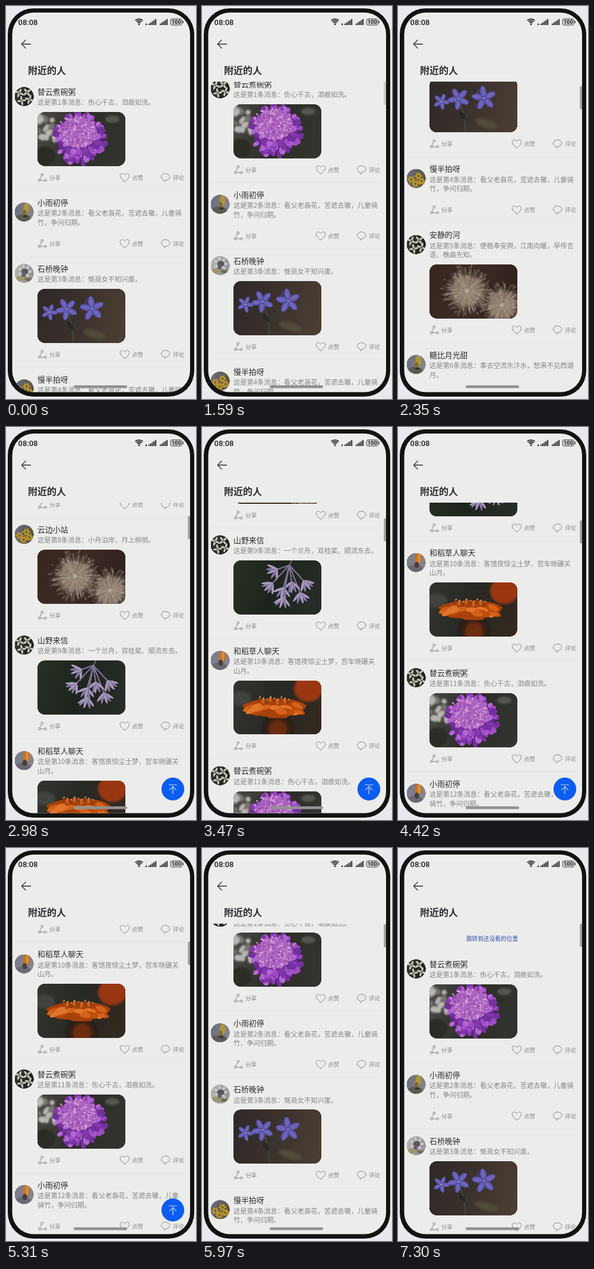
Write an HTML page with a canvas that moves like this. It is 320 by 660 pixels and loops after 8 s.

```html
<!DOCTYPE html>
<html lang="zh">
<head>
<meta charset="utf-8">
<style>
html, body { margin: 0; width: 100%; height: 100%; overflow: hidden; background: #e8e9ed; }
canvas { display: block; width: 320px; height: 660px; }
</style>
</head>
<body>
<canvas id="stage"></canvas>
<script>
const W = 320, H = 660, LOOP = 8000, TAU = Math.PI * 2;
const CJK = '"Noto Sans CJK SC", "Noto Sans CJK", sans-serif';
const INK = '#2b2b2e', GREY = '#858585', PAPER = '#ececeb';
const dpr = Math.max(1, window.devicePixelRatio || 1);
const stage = document.getElementById('stage');
stage.width = W * dpr;
stage.height = H * dpr;
const c = stage.getContext('2d');

function seeded(n) {
  return () => (n = (n * 16807) % 2147483647) / 2147483647;
}

function blob(g, x, y, rx, ry, color, rot = 0) {
  g.fillStyle = color;
  g.beginPath();
  g.ellipse(x, y, rx, ry, rot, 0, TAU);
  g.fill();
}

// Ellipses arranged around a centre
function petals(g, x, y, n, dist, len, wid, color, turn = 0) {
  for (let i = 0; i < n; i++) {
    const a = turn + i * TAU / n;
    blob(g, x + Math.cos(a) * dist, y + Math.sin(a) * dist, len, wid, color, a);
  }
}

function path(g, points, color, width) {
  g.strokeStyle = color;
  g.lineWidth = width;
  g.lineCap = g.lineJoin = 'round';
  g.beginPath();
  for (let i = 0; i < points.length; i += 2) g.lineTo(points[i], points[i + 1]);
  g.stroke();
}

function glow(g, x, y, r, color, core = 0) {
  const grad = g.createRadialGradient(x, y, r * core, x, y, r);
  grad.addColorStop(0, color);
  grad.addColorStop(1, 'rgba(0,0,0,0)');
  g.fillStyle = grad;
  g.fillRect(x - r, y - r, r * 2, r * 2);
}

function picture(w, h, radius, bg, draw) {
  const cv = document.createElement('canvas');
  cv.width = w * 3;
  cv.height = h * 3;
  const g = cv.getContext('2d');
  g.scale(3, 3);
  g.beginPath();
  g.roundRect(0, 0, w, h, radius);
  g.clip();
  const fill = g.createLinearGradient(0, 0, w, h * 0.4);
  bg.forEach((color, i) => fill.addColorStop(i / (bg.length - 1), color));
  g.fillStyle = fill;
  g.fillRect(0, 0, w, h);
  draw(g, seeded(41));
  return cv;
}

const photo = (bg, draw) => picture(148, 90.5, 12, bg, draw);
const face = (bg, draw) => picture(32, 32, 16, bg, draw);

function dandelion(g, rnd, x, y, r) {
  glow(g, x, y, r, 'rgba(150,130,112,.75)', 0.5);
  for (let i = 0; i < 260; i++) {
    const a = rnd() * TAU, d = r * (0.5 + rnd() * 0.5);
    const ex = x + Math.cos(a) * d, ey = y + Math.sin(a) * d;
    path(g, [x, y, ex, ey], 'rgba(200,184,166,.16)', 0.7);
    blob(g, ex, ey, 3, 1.5, 'rgba(180,164,148,.2)', a);
  }
  glow(g, x, y, 9, 'rgba(205,190,170,.6)');
}

// Slim tube opening into narrow hanging petals
function floret(g, rnd, x, y) {
  path(g, [94, 8, x, y], '#7f7093', 2.2);
  const down = Math.atan2(y - 2, x - 92);
  for (let k = -2; k <= 2; k++) {
    const a = down + k * 0.42 + rnd() * 0.25;
    blob(g, x + Math.cos(a) * 9, y + Math.sin(a) * 9, 10, 2.1, k % 2 ? '#8577a0' : '#a798bd', a);
  }
}

const photos = {
  purple: photo(['#4b4a47', '#2c2c27', '#33342f'], (g, rnd) => {
    g.filter = 'blur(5px)';
    for (let i = 0; i < 15; i++) {
      blob(g, rnd() * 34, rnd() * 46, 4 + rnd() * 5, 3 + rnd() * 3,
        i % 3 ? '#b9b7b3' : '#777570', rnd() * 3);
    }
    blob(g, 12, 74, 18, 16, '#2b2c26');
    blob(g, 126, 12, 12, 6, '#55564f');
    g.filter = 'none';
    blob(g, 71, 43, 39, 38, '#65288a');
    for (let i = 0; i < 90; i++) {
      const a = rnd() * TAU, d = 45 - i * 0.22 - rnd() * 5;
      blob(g, 71 + Math.cos(a) * d, 44 + Math.sin(a) * d, 4.5 + rnd() * 3, 3.5 + rnd() * 2,
        ['#8238aa', '#a04dc6', '#7430a0', '#b166d2'][i % 4], a);
    }
    blob(g, 69, 34, 31, 26, '#aa63bd');
    for (let i = 0; i < 230; i++) {
      const a = rnd() * TAU, d = Math.sqrt(rnd());
      blob(g, 68 + Math.cos(a) * d * 34, 32 + Math.sin(a) * d * 28, 1.8, 1.2,
        ['#dda9dd', '#9448ae', '#c184cb', '#b56bc6'][i % 4], a);
    }
  }),
  blue: photo(['#2e2928', '#3b312c', '#4a3d33'], g => {
    g.filter = 'blur(6px)';
    blob(g, 96, 76, 20, 7, '#514b3b', 0.3);
    g.filter = 'none';
    path(g, [61, 91, 58, 62, 50, 36], '#3d4336', 3);
    path(g, [58, 64, 77, 48, 92, 35], '#383a31', 2);
    path(g, [57, 62, 34, 50, 21, 38], '#34352e', 1.5);
    blob(g, 55, 62, 8, 4, '#262a27', 0.9);
    blob(g, 81, 27, 3, 10, '#3e3d62', 0.2);
    [[20, 39, 7], [49, 34, 9.5], [92, 33, 10.5]].forEach(([x, y, r], i) => {
      petals(g, x, y, 5, r, r, r * 0.52, '#564fa0', 0.1 + i * 0.35);
      petals(g, x, y, 5, r * 1.1, r * 0.75, r * 0.32, '#6c65bb', 0.1 + i * 0.35);
      blob(g, x, y, 2, 1.6, '#8f86b0');
    });
  }),
  seed: photo(['#38271f', '#3d2c26', '#30221e'], (g, rnd) => {
    dandelion(g, rnd, 122, 68, 38);
    dandelion(g, rnd, 63, 44, 43);
  }),
  lilac: photo(['#293024', '#1d241d', '#272c27'], (g, rnd) => {
    path(g, [98, 0, 94, 10], '#596257', 2.4);
    [[74, 15], [66, 38], [118, 34], [112, 54], [84, 46], [98, 36], [84, 62]]
      .forEach(([x, y]) => floret(g, rnd, x, y));
  }),
  orange: photo(['#33342f', '#282824', '#33291f'], (g, rnd) => {
    g.filter = 'blur(6px)';
    blob(g, 126, 14, 24, 22, '#9a3712');
    blob(g, 12, 30, 18, 12, '#41433e');
    g.filter = 'none';
    glow(g, 75, 82, 30, '#6b2d10', 0.4);
    g.fillStyle = '#a8410c';
    g.beginPath();
    g.moveTo(15, 42);
    g.bezierCurveTo(40, 26, 105, 26, 123, 42);
    g.bezierCurveTo(114, 62, 92, 55, 90, 63);
    g.lineTo(60, 63);
    g.bezierCurveTo(50, 55, 30, 68, 15, 42);
    g.fill();
    for (let i = 0; i < 22; i++) {
      const u = rnd() * 2 - 1;
      blob(g, 69 + u * 44, 42 + rnd() * 12, 10, 4,
        ['#d5621a', '#bd4d0e', '#e0752a'][i % 3], u * 0.5);
    }
    for (let i = 0; i < 9; i++) {
      blob(g, 44 + i * 6, 32 + i % 3 * 2, 2.5, 4.5, i % 2 ? '#c9641f' : '#8d3d10');
      blob(g, 45 + i * 6, 28 + i % 3 * 2, 1.3, 1.3, '#c59a72');
    }
  })
};

const faces = {
  white: face(['#363a31', '#1f241f'], g => {
    [[8, 10], [21, 9], [12, 23], [25, 21]].forEach(([x, y], i) => {
      petals(g, x, y, 4, 4, 4, 1.7, '#c4c4bb', 0.4 + i * 0.5);
      blob(g, x, y, 1.5, 1.5, '#5d5c46');
    });
  }),
  yellow: face(['#686c7e', '#85838b'], g => {
    blob(g, 14, 26, 13, 6, '#5c5b55');
    blob(g, 20, 10, 5, 9, '#b0943a');
    blob(g, 17, 18, 3, 6, '#7d6a2e');
    blob(g, 18, 23, 4, 2, '#39342c');
  }),
  mixed: face(['#bbb9b4', '#96959a'], g => {
    petals(g, 17, 13, 7, 8, 4, 2, '#c9c6ca');
    blob(g, 17, 13, 6, 5, '#5a5561');
    blob(g, 15, 19, 3, 6, '#65605f');
    blob(g, 9, 25, 8, 4, '#a0946a');
    blob(g, 23, 26, 6, 3, '#706f5c');
  }),
  gold: face(['#6f6e85', '#58553f'], g => {
    [[8, 18], [20, 12], [25, 21], [15, 25]].forEach(([x, y], i) => {
      petals(g, x, y, 6, 3.4, 3, 1.8, '#b8942c', i);
      blob(g, x, y, 1.8, 1.8, '#6c5524');
    });
  }),
  flame: face(['#76798c', '#8a8591'], g => {
    blob(g, 14, 26, 13, 6, '#6d6974');
    blob(g, 20, 9, 6, 9, '#c37426');
    blob(g, 21, 9, 2, 8, '#da9341');
    blob(g, 17, 20, 4, 5, '#45403a');
  })
};

// name, avatar, photo, message lines
const posts = [
  ['替云煮碗粥', 'white', 'purple', '伤心千古，泪痕如洗。'],
  ['小雨初停', 'yellow', '', '看父老袅花，苦遮去辙，儿童骑', '竹，争问归期。'],
  ['石桥晚钟', 'mixed', 'blue', '慨商女不知兴废。'],
  ['慢半拍呀', 'gold', '', '看父老袅花，苦遮去辙，儿童骑', '竹，争问归期。'],
  ['安静的河', 'white', 'seed', '便稳奉安舆，江南向暖，早传言', '语，樵曲先知。'],
  ['糖比月光甜', 'yellow', '', '事去空流东汴水，愁来不见西湖', '月。'],
  ['竹篮打水', 'mixed', 'blue', '晚风过桥，灯火如初。'],
  ['云边小站', 'gold', 'seed', '小舟泊岸，月上柳梢。'],
  ['山野来信', 'white', 'lilac', '一个兰舟，双桂桨、顺流东去。'],
  ['和稻草人聊天', 'flame', 'orange', '客馆夜惊尘土梦，宫车晓碾关', '山月。'],
  ['替云煮碗粥', 'white', 'purple', '伤心千古，泪痕如洗。'],
  ['小雨初停', 'flame', '', '看父老袅花，苦遮去辙，儿童', '骑竹，争问归期。']
];

function text(s, x, cy, size, color, weight = 400, align = 'left') {
  c.font = `${weight} ${size}px ${CJK}`;
  c.fillStyle = color;
  c.textAlign = align;
  c.fillText(s, x, cy + size * 0.37);
}

function ring(x, y, r) {
  c.beginPath();
  c.arc(x, y, r, 0, TAU);
  c.stroke();
}

function actions(y) {
  path(c, [60, y - 3.2, 57, y + 3], GREY, 1);
  path(c, [58.2, y + 4.8, 64.5, y + 4.8], GREY, 1);
  ring(60.8, y - 5, 1.9);
  ring(56.2, y + 4.8, 1.9);
  ring(66.4, y + 4.8, 1.9);
  c.beginPath();
  c.moveTo(200, y + 6.8);
  c.bezierCurveTo(186, y - 2, 194, y - 11, 200, y - 4.2);
  c.bezierCurveTo(206, y - 11, 214, y - 2, 200, y + 6.8);
  c.stroke();
  c.beginPath();
  c.ellipse(268.6, y - 1, 7.2, 5.6, 0, 2.05, 2.05 + TAU - 0.5);
  c.lineTo(267.5, y + 7);
  c.closePath();
  c.stroke();
  text('分享', 73, y, 9.6, GREY);
  text('点赞', 212, y, 9.6, GREY);
  text('评论', 281, y, 9.6, GREY);
}

function drawList(scroll) {
  let y = 123.5 - scroll;
  text('跳转到还没看的位置', 158.5, 101 - scroll, 9.7, '#3450ad', 400, 'center');
  posts.forEach(([name, avatar, img, ...lines], i) => {
    const two = lines.length > 1;
    const act = img ? (two ? 180 : 164.5) : 89.5;
    if (y < H && y + act + 22 > 120) {
      c.drawImage(faces[avatar], 14.5, y + (two ? 20.5 : 12.5), 32, 32);
      text(name, 53, y + 20.5, 12.9, INK, 500);
      text(`这是第${i + 1}条消息：${lines[0]}`, 53, y + 38.5, 11.27, GREY);
      if (two) text(lines[1], 53, y + 54, 11.27, GREY);
      if (img) c.drawImage(photos[img], 53, y + (two ? 70 : 54.5), 148, 90.5);
      actions(y + act);
      c.fillStyle = '#e2e2e1';
      c.fillRect(14, y + act + 21.2, 289, 0.8);
    }
    y += act + 21.5;
  });
}

function drawSignal(x) {
  for (let i = 0; i < 5; i++) {
    const h = 2.5 + i * 1.9;
    c.fillStyle = '#222';
    c.fillRect(x + i * 2.8, 32 - h, 1.9, h);
  }
}

function drawHeader() {
  c.fillStyle = '#1f1f21';
  c.textAlign = 'left';
  c.font = '500 13px Roboto, sans-serif';
  c.fillText('08:08', 20.5, 31.5);
  c.strokeStyle = '#222';
  c.lineWidth = 1.7;
  c.lineCap = 'butt';
  [9.2, 6.3, 3.4].forEach(r => {
    c.beginPath();
    c.arc(224, 31, r, -2.35, -0.79);
    c.stroke();
  });
  blob(c, 224, 30.8, 1.4, 1.4, '#222');
  c.fillStyle = '#222';
  c.fillRect(235, 29.5, 2.2, 2.5);
  drawSignal(240);
  drawSignal(259);
  c.fillStyle = '#d4d4d4';
  c.strokeStyle = '#4a4a4a';
  c.lineWidth = 1;
  c.beginPath();
  c.roundRect(277, 21.5, 19.5, 10.5, 3);
  c.fill();
  c.stroke();
  c.fillStyle = '#444';
  c.fillRect(297.6, 24.5, 1.3, 4.5);
  c.fillStyle = '#1f1f21';
  c.textAlign = 'center';
  c.font = '700 9.4px Roboto, sans-serif';
  c.fillText('100', 286.8, 30.2);
  path(c, [41.5, 64, 26.5, 64], '#333', 1.3);
  path(c, [33, 57.2, 26.3, 64, 33, 70.8], '#333', 1.3);
  text('附近的人', 37, 108, 16, INK, 700);
}

function drawTopButton() {
  blob(c, 281, 608, 19.2, 19.2, '#0b5df0');
  path(c, [274.5, 601, 287.5, 601], '#cfdcf4', 1.2);
  path(c, [281, 616, 281, 604], '#cfdcf4', 1.2);
  path(c, [275.5, 609.3, 281, 603.8, 286.5, 609.3], '#cfdcf4', 1.2);
}

// start, end, from, to, ease-out power
const moves = [
  [1510, 1580, 0, 13, 1],
  [1580, 2350, 13, 353.5, 1.4],
  [2350, 3470, 353.5, 1232.5, 2],
  [4000, 4840, 1232.5, 1430, 2.58],
  [5500, 6310, 1430, -51, 3.27]
];

function scrollAt(t) {
  let pos = 0;
  for (const [a, b, from, to, p] of moves) {
    if (t < a) break;
    const u = Math.min(1, (t - a) / (b - a));
    pos = from + (to - from) * (1 - Math.pow(1 - u, p));
  }
  return pos;
}

// Motion advances in 70 ms ticks
function tick(t) {
  const base = t < 4000 ? 2350 : t < 5200 ? 4070 : 5970;
  return base + Math.floor((t - base + 8) / 70) * 70;
}

function render(now) {
  const t = tick(now % LOOP), scroll = scrollAt(t);
  c.setTransform(dpr, 0, 0, dpr, 0, 0);
  c.fillStyle = '#e8e9ed';
  c.fillRect(0, 0, W, H);
  c.fillStyle = '#111312';
  c.beginPath();
  c.roundRect(3, 4, 314, 652, 43);
  c.fill();
  c.save();
  c.beginPath();
  c.roundRect(10.5, 11, 299.5, 637.5, 36);
  c.fillStyle = PAPER;
  c.fill();
  c.clip();
  drawHeader();
  c.save();
  c.beginPath();
  c.rect(10, 127, 300, 522);
  c.clip();
  drawList(scroll);
  if (t >= 1580) {
    c.fillStyle = t < 1650 ? '#cacaca' : '#a0a0a0';
    c.beginPath();
    c.roundRect(306.3, 127 + Math.max(0, scroll) * 0.0211, 4, 39, 2);
    c.fill();
  }
  c.restore();
  if (scroll > 700) drawTopButton();
  c.fillStyle = '#929292';
  c.beginPath();
  c.roundRect(114, 637, 90, 4.8, 2.4);
  c.fill();
  c.restore();
}

const start = performance.now();
function loop() {
  render(performance.now() - start);
  requestAnimationFrame(loop);
}
loop();
</script>
</body>
</html>
```
